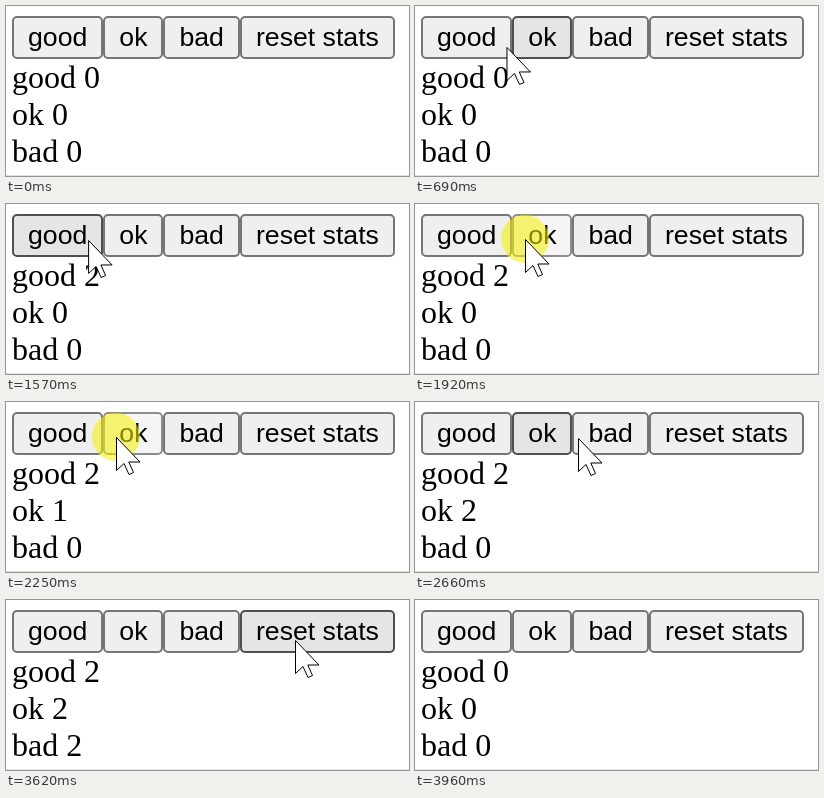
Recreate the animation shown at these times as an HTML page. Size 403 by 170 pixels, loop 4.56 s.

```html
<!DOCTYPE html>
<html lang="en">
<head>
<meta charset="utf-8">
<title>Button stats</title>
<style>
  html, body { margin: 0; width: 100%; height: 100%; overflow: hidden; background: #fff; }
  svg { display: block; }
  .label { font: 26.667px "Liberation Sans", Arial, sans-serif; }
  .stat { font: 32px "Liberation Serif", "Times New Roman", serif; }
  .button { fill: #efefef; stroke: #767676; stroke-width: 2; }
  .hover { fill: #e5e5e5; stroke: #4f4f4f; }
  .active { fill: #f5f5f5; stroke: #8d8d8d; }
</style>
</head>
<body>
<svg id="stage" width="403" height="170" viewBox="0 0 403 170">
  <rect y="169" width="403" height="1" fill="#dedede"/>
</svg>
<script>
const LOOP = 4560, STEP = 70, HIDE = 3960;
const LEFT = 6, TOP = 10, HEIGHT = 43, PAD = 16;
const entry = { x: 328, y: 150 };

// The pointer leaves for each button, arrives, then presses it
const visits = [
  { name: 'good', x: 65, y: 37, leave: 260, arrive: 760, presses: [830, 1370], hold: 70 },
  { name: 'ok', x: 110, y: 35, leave: 1440, arrive: 1850, presses: [1920, 2250], hold: 70 },
  { name: 'bad', x: 163, y: 36, leave: 2450, arrive: 2660, presses: [2730, 3130], hold: 130 },
  { name: 'reset stats', x: 289, y: 40, leave: 3260, arrive: 3620, presses: [3750], hold: 130 }
];
const [counters, reset] = [visits.slice(0, -1), visits.at(-1)];

const stage = document.getElementById('stage');

function add(tag, attrs, text = '') {
  const el = document.createElementNS('http://www.w3.org/2000/svg', tag);
  for (const key in attrs) el.setAttribute(key, attrs[key]);
  el.textContent = text;
  return stage.appendChild(el);
}

// Each button is as wide as its label plus padding
let edge = LEFT;
for (const v of visits) {
  v.rect = add('rect', { y: TOP + 1, height: HEIGHT - 2, rx: 4 });
  const label = add('text', { class: 'label', x: edge + PAD, y: 40 }, v.name);
  v.left = Math.round(edge);
  edge += label.getComputedTextLength() + 2 * PAD;
  v.right = Math.round(edge);
  v.rect.setAttribute('x', v.left + 1);
  v.rect.setAttribute('width', v.right - v.left - 2);
}
counters.forEach((v, i) => {
  v.stat = add('text', { class: 'stat', x: LEFT, y: 82 + 37 * i });
});
const spot = add('circle', { r: 24, fill: '#f5f000', 'fill-opacity': 0.55 });
const pointer = add('path', {
  d: 'M.5 .5V33.5L8 26.5L13 37.5L17.5 35.5L12.8 25H24Z',
  fill: '#fff', stroke: '#000'
});

// Ease out in even jumps of about one STEP, flattening faster vertically
function pointerAt(t) {
  const i = Math.max(0, visits.findLastIndex(v => t >= v.leave));
  const to = visits[i], from = visits[i - 1] || entry;
  const jumps = Math.round((to.arrive - to.leave) / STEP);
  const p = (t - to.leave) / (to.arrive - to.leave);
  const left = 1 - Math.min(1, Math.max(0, Math.floor(p * jumps + 0.1) / jumps));
  return {
    x: to.x + (from.x - to.x) * left ** 1.18,
    y: to.y + (from.y - to.y) * left ** 1.72
  };
}

function draw(t) {
  const visible = t >= visits[0].leave && t < HIDE;
  const { x, y } = pointerAt(t);
  const seen = pointerAt(t - STEP); // hover lags one step behind
  const isReset = t >= reset.presses[0] + reset.hold;
  let lit = false;

  for (const v of visits) {
    const pressed = v.presses.some(p => t >= p && t < p + v.hold);
    const hovered = visible && seen.x >= v.left && seen.x < v.right &&
      seen.y >= TOP && seen.y < TOP + HEIGHT;
    lit ||= pressed;
    v.rect.setAttribute('class', 'button' + (pressed ? ' active' : hovered ? ' hover' : ''));
  }
  for (const v of counters) {
    const count = isReset ? 0 : v.presses.filter(p => t >= p + v.hold).length;
    v.stat.textContent = `${v.name} ${count}`;
  }

  const place = `translate(${x} ${y})`;
  spot.setAttribute('transform', place);
  pointer.setAttribute('transform', place);
  spot.style.display = lit ? '' : 'none';
  pointer.style.display = visible ? '' : 'none';
}

const start = performance.now();
function tick() {
  draw((performance.now() - start) % LOOP);
  requestAnimationFrame(tick);
}
tick();
</script>
</body>
</html>
```
